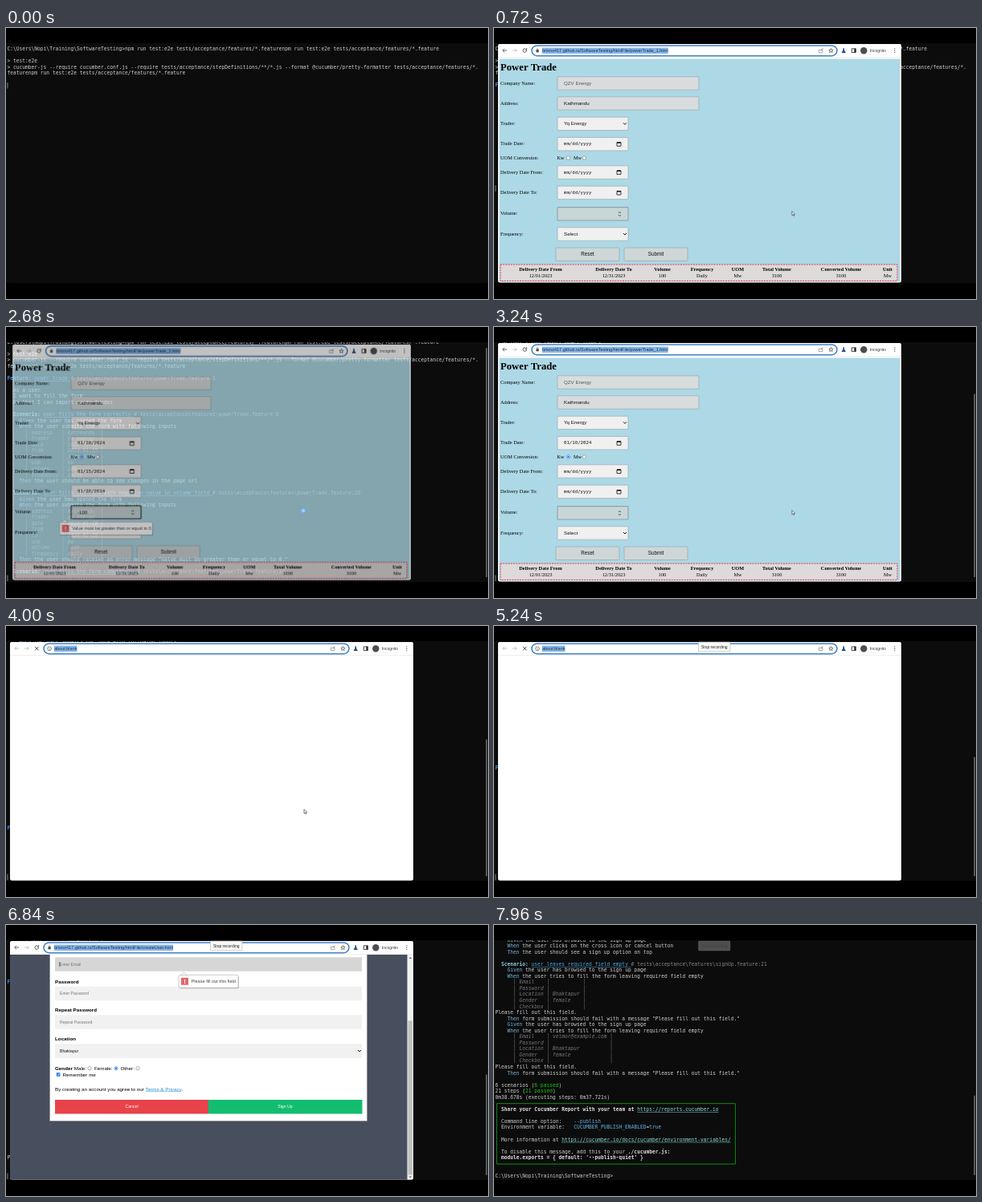
An HTML page with a canvas that plays this animation: 600 px wide and 338 px high, repeating every 8000 ms.

```html
<!DOCTYPE html>
<html lang="en">
<head>
<meta charset="utf-8">
<title>End-to-end test run</title>
<style>
html, body { margin: 0; width: 100%; height: 100%; overflow: hidden; background: #000; }
canvas { display: block; }
</style>
</head>
<body>
<canvas id="stage" width="600" height="338"></canvas>
<script>
const LOOP = 8000, ROWS = 39, CH = 3.758, LH = 7.545;
const MONO = '"DejaVu Sans Mono", monospace';
const SANS = '"Liberation Sans", Arial, sans-serif';
const SERIF = '"Liberation Serif", "Times New Roman", serif';
const HOST = 'brisno417.github.io/SoftwareTesting/htmlFile/';

const screen = document.getElementById('stage').getContext('2d');
const layer = Object.assign(document.createElement('canvas'), { width: 600, height: 338 }).getContext('2d');
let g = screen;

// ---------- drawing helpers ----------
const clamp = v => Math.max(0, Math.min(1, v));
const ease = v => { v = clamp(v); return v * v * (3 - 2 * v); };

function rect(x, y, w, h, fill, stroke, radius = 0, lineWidth = .6) {
  g.beginPath();
  g.roundRect(x, y, w, h, radius);
  if (fill) { g.fillStyle = fill; g.fill(); }
  if (stroke) { g.strokeStyle = stroke; g.lineWidth = lineWidth; g.stroke(); }
}

function path(points, color, width = .8, fill) {
  g.beginPath();
  for (let i = 0; i < points.length; i += 2) g.lineTo(points[i], points[i + 1]);
  if (fill) { g.closePath(); g.fillStyle = fill; g.fill(); }
  if (color) { g.strokeStyle = color; g.lineWidth = width; g.stroke(); }
}

function ring(x, y, r, color, width = .7, fill, sweep = 7) {
  g.beginPath();
  g.arc(x, y, r, 0, sweep);
  if (fill) { g.fillStyle = fill; g.fill(); }
  if (color) { g.strokeStyle = color; g.lineWidth = width; g.stroke(); }
}

// Glyphs are laid out ten times larger, so advances stay fractional.
function text(s, x, y, size, color, font = SANS, style = '', align = 'left') {
  g.save();
  g.translate(x, y);
  g.scale(.1, .1);
  g.font = `${style} ${size * 10}px ${font}`;
  g.fillStyle = color;
  g.textAlign = align;
  g.textBaseline = 'middle';
  g.fillText(s, 0, 0);
  const width = g.measureText(s).width / 10;
  g.restore();
  return width;
}

// ---------- terminal log; ^x switches to style x ----------
const STYLES = {
  w: ['#cccccc'], W: ['#dcdcdc', 'bold'], k: ['#74b4d8'], F: ['#3b8eea', 'bold'], f: ['#3b8eea', '', 1],
  S: ['#8fcbdc', 'bold'], s: ['#4ba3dc', '', 1], d: ['#858585'], t: ['#767676', 'italic'],
  g: ['#16c60c'], l: ['#8adada', '', 1], c: ['#61b4e6']
};
const log = [];
let stamp = 0;
const at = ms => { stamp = ms; };
const print = (...lines) => lines.forEach(s => log.push({ at: stamp, parts: s.split('^').slice(1) }));
const where = file => ` ^d# tests\\acceptance\\features\\${file}`;
const feature = (name, file, ...about) =>
  print(`^FFeature:^w ^f${name}${where(file)}`, '^w', ...about.map(s => '^w  ' + s));
const scenario = (name, file) => print('^w', `^w  ^SScenario:^w ^s${name}${where(file)}`);
const step = (word, s) => print(`^w    ^k${word}^w ${s}`);
function table(rows) {
  const wide = [0, 1].map(i => Math.max(...rows.map(r => r[i].length)));
  rows.forEach(r => print(`^w      ^t│ ${r[0].padEnd(wide[0])} │ ${r[1].padEnd(wide[1])} │`));
}
const tradeRows = volume => [['address', 'kathmandu'], ['trader', 'yq energy'], ['date', '2024-01-10'],
  ['from', '2024-01-15'], ['to', '2024-01-20'], ['uom', 'kw'], ['volume', volume], ['frequency', 'daily']];
const userRows = (email, password = '') => [['Email', email], ['Password', password],
  ['Location', 'Bhaktapur'], ['Gender', 'female'], ['Checkbox', '']];

const EMAIL = 'velmor@example.com', FILL = 'Please fill out this field.', NEGATIVE = 'Value must be greater than or equal to 0.';
const PROMPT = '^wC:\\Users\\Nopi\\Training\\SoftwareTesting>';
const RUN = 'npm run test:e2e tests/acceptance/features/*.feature';
const OPENED = 'the user has opened the form', SUBMITS = 'the user submits the form with following inputs';
const BROWSED = 'the user has browsed to the sign up page';
const LEAVES = 'the user tries to fill the form leaving required field empty';

print(PROMPT + RUN + RUN, '^w', '^w> test:e2e',
  '^w> cucumber-js --require cucumber.conf.js --require tests/acceptance/stepDefinitions/**/*.js --format @cucumber/pretty-formatter tests/acceptance/features/*.',
  '^wfeature' + RUN, '^w');
at(240);
feature('power trade', 'powerTrade.feature:1', 'As a user', 'I want to fill the form', 'So that I can import power trades');
scenario('user fills the form correctly', 'powerTrade.feature:6');
step('Given', OPENED);
at(600); step('When', SUBMITS); table(tradeRows('100'));
at(1240); step('Then', 'the user should be able to see changes in the page url');
at(1300); scenario('user fills the form with negative value in volume field', 'powerTrade.feature:20');
at(1360); step('Given', OPENED);
at(1660); step('When', SUBMITS); table(tradeRows('-100'));
at(2580); step('Then', `the user should receive an error message "${NEGATIVE}"`);
at(2620); scenario('user fills the form completely', 'powerTrade.feature:34');
at(2760); step('Given', OPENED);
at(3000); step('When', SUBMITS); table(tradeRows('100'));
at(3640); step('Then', 'the following values should be listed'); table(tradeRows('100').slice(1));
at(3800); print('^w');
feature('sign up', 'signUp.feature:1', 'As a user', 'I want to sign up', 'So that I can use the application');
scenario('user signs up with valid details', 'signUp.feature:6');
step('Given', BROWSED);
at(4140); step('When', 'the user fills the form with following details'); table(userRows(EMAIL, 'pass1234'));
at(4960); step('Then', 'the user should be signed up');
at(5060); scenario('user cancels the sign up', 'signUp.feature:16');
step('Given', BROWSED);
at(5360); step('When', 'the user clicks on the cross icon or cancel button');
at(5760); step('Then', 'the user should see a sign up option on top');
at(5940); scenario('user leaves required field empty', 'signUp.feature:21');
step('Given', BROWSED);
const failsWith = () => { print('^w' + FILL); step('Then', `form submission should fail with a message "${FILL}"`); };
at(6240); step('When', LEAVES); table(userRows(''));
at(6660); failsWith();
at(6820); step('Given', BROWSED);
at(6960); step('When', LEAVES); table(userRows(EMAIL));
at(7480); failsWith();
at(7720);
print('^w', '^w6 scenarios (^g6 passed^w)', '^w21 steps (^g21 passed^w)', '^w0m38.678s (executing steps: 0m37.721s)');
const boxTop = log.length;
print('^w', '^W  Share your Cucumber Report with your team at ^lhttps://reports.cucumber.io', '^w',
  '^w  Command line option:    ^c--publish', '^w  Environment variable:   ^cCUCUMBER_PUBLISH_ENABLED^w=^ctrue', '^w',
  '^w  More information at ^lhttps://cucumber.io/docs/cucumber/environment-variables/', '^w',
  '^w  To disable this message, add this to your ^W./cucumber.js:', "^W  module.exports = { default: '--publish-quiet' }", '^w');
const boxEnd = log.length;
at(7860); print('^w', PROMPT);

function terminal(t) {
  const count = log.filter(l => l.at <= t).length, done = count === log.length;
  const total = count + (done ? 0 : 1), top = Math.max(0, total - ROWS);
  const rowY = i => 26.5 + (i - top) * LH;
  rect(0, 19, 600, 299, '#0c0c0c');
  for (let i = Math.max(0, top - 1); i < count; i++) {
    let x = 1.5;
    for (const part of log[i].parts) {
      const [color, style = '', underline] = STYLES[part[0]], s = part.slice(1), y = rowY(i);
      text(s, x, y, 6.244, color, MONO, style);
      if (underline) rect(x, y + 2.8, s.length * CH, .5, color);
      x += s.length * CH;
    }
  }
  if (count >= boxEnd) rect(3.4, rowY(boxTop), 297, rowY(boxEnd - 1) - rowY(boxTop), null, '#138a14', 0, 1);
  if (!done) rect(1.6, rowY(count) - 3.7, .7, 7.4, '#bbb');
  if (total > ROWS) {
    const h = 293 * ROWS / total;
    rect(597.5, 312 - h, 1.2, h, '#8a8a8a');
  }
}

// ---------- browser ----------
function toolbar(url, loading) {
  rect(5, 20, 502, 17, '#fff');
  const ink = '#444', pale = loading ? '#b5b5b5' : ink;
  path([16, 28, 10.8, 28], pale); path([13, 25.7, 10.7, 28, 13, 30.3], pale);
  path([23, 28, 28.2, 28], '#b5b5b5'); path([26, 25.7, 28.3, 28, 26, 30.3], '#b5b5b5');
  if (loading) { path([36, 25.8, 40.6, 30.4], ink, 1); path([40.6, 25.8, 36, 30.4], ink, 1); }
  else { ring(38.3, 28, 2.3, ink, .8, null, 5.3); path([40.6, 25, 40.6, 27.4, 38.4, 27.4], ink); }
  rect(47, 21.9, 380, 12.8, '#fff', '#3f80c4', 6.4, 1.5);
  if (loading) { ring(54, 28.2, 2.4, '#555'); rect(53.7, 27.6, .7, 2, '#555'); }
  else { rect(52.5, 27.4, 3.2, 2.8, '#444'); ring(54.1, 27, 1.1, '#444', .6); }
  g.font = '55px ' + SANS;
  rect(60, 24.6, g.measureText(url).width / 10, 7.4, '#86b6ea');
  text(url, 60, 28.4, 5.5, '#1f2c3c');
  rect(404.5, 27, 4.5, 3.6, null, '#777'); path([406.5, 28.5, 409.5, 25.5], '#777');
  const star = [];
  for (let i = 0; i <= 10; i++) {
    const r = i % 2 ? 1.2 : 2.8, a = i * Math.PI / 5 - Math.PI / 2;
    star.push(419.5 + r * Math.cos(a), 28.3 + r * Math.sin(a));
  }
  path(star, '#444', .7);
  path([434.5, 25.3, 436, 25.3, 436.2, 28, 438, 31, 432.5, 31, 434.3, 28], null, 0, '#244e7c');
  rect(445.4, 25.8, 5, 4.8, null, '#333', 0, .9); rect(448.3, 25.8, 2.1, 4.8, '#333');
  rect(455, 23, 36, 10.5, null, '#eee', 5);
  ring(460.3, 28.2, 4.2, null, 0, '#4a4d51');
  text('Incognito', 468, 28.4, 4.9, '#333');
  [25.8, 28.2, 30.6].forEach(y => ring(498.8, y, .65, null, 0, '#444'));
}

function bubble(x, y, w, message) {
  rect(x + .8, y + 1, w, 16, 'rgba(0,0,0,.25)', null, 1.5);
  rect(x, y, w, 16, '#fff', '#aaa', 1.5);
  path([x + 3, y + .4, x + 6.5, y - 3.5, x + 10, y + .4], '#aaa', .6, '#fff');
  rect(x + 3, y + 3.4, 9, 9, '#e0686c');
  text('!', x + 7.5, y + 8.2, 8, '#fff', SANS, 'bold', 'center');
  text(message, x + 15.5, y + 8.5, 5.6, '#444');
}

function radio(x, y, on) {
  ring(x, y, 2.2, on ? '#1a73e8' : '#777', .6, '#fff');
  if (on) ring(x, y, 1.2, null, 0, '#1a73e8');
}

const typed = (s, dt, start) => s.slice(0, Math.max(0, Math.floor((dt - start) / 8)));

function trade(volume, span) {
  const page = dt => {
    const p = dt / span, edge = '#8fa2a8';
    const put = (s, y, k, empty) => text(p > k ? s : empty, 87, y + .3, 6.2, '#111');
    rect(6.5, 38.5, 499, 278, '#add8e6');
    text('Power Trade', 8, 50, 12.7, '#000', SERIF, 'bold');
    const labels = { 'Company Name:': 69, 'Address:': 94, 'Trader:': 119.4, 'Trade Date:': 144.7, 'UOM Conversion:': 162,
      'Delivery Date From:': 180, 'Delivery Date To:': 205.4, 'Volume:': 231.8, 'Frequency:': 257 };
    for (const name in labels) {
      const y = labels[name], wide = y < 100, focus = name === 'Volume:';
      text(name, 8, y, 6.35, '#000', SERIF);
      if (name === 'UOM Conversion:') continue;
      rect(79, y - 8.2, wide ? 176 : 88, 16.4, focus ? '#c8d6d8' : wide ? '#d8dcdc' : '#f0f0f0',
        focus && p > .6 ? '#222' : edge, .5, focus ? 1.1 : .6);
    }
    text('QZV Energy', 87, 69.3, 6.2, '#555');
    text(typed('Kathmandu', dt, span * .06), 87, 94.4, 6.2, '#111');
    put('Yq Energy', 119.4, .2, 'Select');
    put('Daily', 257, .8, 'Select');
    [119.4, 257].forEach(y => path([161, y - 1, 163, y + 1, 165, y - 1], '#111', 1));
    [['01/10/2024', 144.7, .3], ['01/15/2024', 180, .45], ['01/20/2024', 205.4, .55]].forEach(([s, y, k]) => {
      text(p > k ? s : 'mm/dd/yyyy', 87, y + .3, 5.7, '#111', MONO);
      rect(153, y - 2, 5, 4.6, null, '#111', 0, .8); rect(153, y - 2.4, 5, 1.5, '#111');
    });
    text('Kw', 78.5, 162, 6.3, '#000', SERIF); radio(92.5, 162, p > .38);
    text('Mw', 99, 162, 6.3, '#000', SERIF); radio(112.5, 162, false);
    text(typed(volume, dt, span * .62), 87, 232, 6.2, '#111');
    path([155, 231, 156.5, 229.3, 158, 231], '#333', .8); path([155, 233, 156.5, 234.7, 158, 233], '#333', .8);
    [['Reset', 77], ['Submit', 162]].forEach(([s, x]) => {
      rect(x, 274, 79, 16.5, '#ced6d7', edge, 1);
      text(s, x + 39.5, 282.6, 6.3, '#111', SANS, '', 'center');
    });
    g.setLineDash([2, 1.2]);
    rect(8, 295, 494, 20.4, '#dedada', '#e0364a', 0, 1);
    g.setLineDash([]);
    [['Delivery Date From', '12/01/2023', 58], ['Delivery Date To', '12/31/2023', 149], ['Volume', '100', 209.5],
      ['Frequency', 'Daily', 259], ['UOM', 'Mw', 303.5], ['Total Volume', '3100', 352],
      ['Converted Volume', '3100', 432], ['Unit', 'Mw', 490]].forEach(([head, cell, x]) => {
      text(head, x, 301, 6.3, '#000', SERIF, 'bold', 'center');
      text(cell, x, 309.3, 6.3, '#000', SERIF, '', 'center');
    });
    if (volume < 0 && p > .86) bubble(64.4, 244.3, 117, NEGATIVE);
  };
  page.url = HOST + 'powerTrade_1.html';
  return page;
}

function signUpForm(dt, email, password, tipAt) {
  const scroll = 105 * ease((dt - 100) / 160), warn = dt > tipAt;
  rect(5, 37, 495, 281, '#474e5d');
  g.save();
  g.translate(0, 105 - scroll);
  rect(54.5, -52, 395, 296.5, '#fff', '#888');
  text('Sign Up', 61, -28, 12.5, '#000', SANS, 'bold');
  text('×', 436, -40, 16, '#444');
  text('Please fill in this form to create an account.', 61, -6, 6.25, '#000');
  rect(61, 8, 382, .7, '#ddd');
  const field = (label, y, value, hint, focus) => {
    text(label, 61, y - 14.3, 6.25, '#000', SANS, 'bold');
    rect(61, y - 8.8, 382, 17.6, focus ? '#d6d6d6' : '#f1f1f1');
    text(value || hint, 67, y + .3, 5.1, value ? '#111' : '#757575');
    if (focus && !value) rect(66.6, y - 3, .6, 6, '#111');
  };
  field('Email', 49, typed(email, dt, 60), 'Enter Email', warn && !email);
  field('Password', 85.5, typed(password, dt, 150), 'Enter Password', warn && email);
  field('Repeat Password', 121, typed(password, dt, 210), 'Repeat Password');
  field('Location', 157, 'Bhaktapur', '');
  path([438, 156, 440, 158, 442, 156], '#111', 1);
  text('Gender', 61, 179.3, 6.25, '#000', SANS, 'bold');
  [['Male:', 84.8, 104], ['Female:', 110, 137], ['Other:', 142.5, 164]].forEach(([s, x, dot], i) => {
    text(s, x, 179.3, 6.25, '#000');
    radio(dot, 178.8, i === 1 && dt > 230);
  });
  rect(62.8, 184.2, 4.6, 4.6, '#1a73e8', null, .6);
  path([63.8, 186.5, 64.8, 187.6, 66.5, 185.2], '#fff', .8);
  text('Remember me', 70.5, 187, 6.25, '#000');
  const x = 61 + text('By creating an account you agree to our ', 61, 205, 6.25, '#000');
  const w = text('Terms & Privacy', x, 205, 6.25, '#2a8fd6');
  rect(x, 207.6, w, .5, '#2a8fd6');
  text('.', x + w, 205, 6.25, '#000');
  rect(61, 218, 191, 17.5, '#e8434b');
  rect(252, 218, 191.5, 17.5, '#12bd70');
  text('Cancel', 156.5, 227, 5.2, '#fff', SANS, '', 'center');
  text('Sign Up', 347.5, 227, 5.2, '#fff', SANS, '', 'center');
  if (warn) bubble(215, email ? 98.5 : 62.3, 74, FILL);
  g.restore();
  rect(499.5, 37, 8, 281, '#f1f1f1');
  rect(500.5, 45 + scroll * .71, 5.5, 192, '#c1c1c1');
  path([501.5, 42, 503.2, 40, 505, 42], null, 0, '#666');
  path([501.5, 313.5, 503.2, 315.5, 505, 313.5], null, 0, '#666');
}

function landing() {
  rect(5, 37, 502, 281, '#fff');
  rect(8, 41, 58, 18, '#12bd70');
  text('Sign Up', 37, 50.3, 5.6, '#fff', SANS, '', 'center');
}

const signUp = draw => Object.assign(draw, { url: HOST + 'createUser.html' });
// open, load, close, page
const windows = [
  [320, 560, 1280, trade('100', 600)],
  [1400, 1640, 2640, trade('-100', 900)],
  [2800, 3000, 3700, trade('100', 560)],
  [3860, 4120, 5000, signUp(dt => signUpForm(dt, EMAIL, 'pass1234', Infinity))],
  [5120, 5340, 5840, signUp(dt => dt < 300 ? signUpForm(dt, '', '', Infinity) : landing())],
  [6000, 6220, 7560, signUp(dt => dt < 680 ? signUpForm(dt, '', '', 420) : signUpForm(dt - 680, EMAIL, '', 420))]
];

function browser(t) {
  const win = windows.find(([open, , close]) => t >= open && t < close + 160);
  if (!win) return false;
  const [open, load, close, page] = win, loading = t < load;
  const shown = Math.min(clamp((t - open) / 120), 1 - clamp((t - close) / 160)), scale = .952 + .048 * shown;
  g = layer;
  g.clearRect(0, 0, 600, 338);
  g.save();
  g.beginPath();
  g.roundRect(5, 20, 502, 297.5, 2.5);
  g.clip();
  rect(5, 20, 502, 298, '#fff');
  if (!loading) page(t - load);
  toolbar(loading ? 'about:blank' : page.url, loading);
  rect(5, 36.6, 502, .5, '#ddd');
  g.restore();
  g = screen;
  g.save();
  g.globalAlpha = shown;
  g.translate(256, 168.5);
  g.scale(scale, scale);
  g.drawImage(layer.canvas, -256, -168.5);
  g.restore();
  return t < close;
}

function pointer(t, ready) {
  if (t < 240 || t > 4900) return;
  if (!ready) {
    ring(370, 229, 2.8, '#6aaeea', 1.4, '#a9cdec');
    return;
  }
  const k = ease((t - 4500) / 360);
  g.save();
  g.translate(371 - 100 * k, 228.5 - 222 * k);
  path([0, 0, 0, 5.2, 1.2, 4.1, 2, 6, 2.9, 5.6, 2.1, 3.8, 3.7, 3.8, 0, 0], '#333', .6, '#fff');
  g.restore();
}

function recordingTip(t) {
  g.save();
  g.globalAlpha = clamp((t - 4860) / 80) * (1 - .72 * clamp((t - 7860) / 100));
  rect(254.5, 20, 39.5, 12, '#f7f7f7', '#bbb', .8);
  text('Stop recording', 274.2, 26.3, 5, '#222', SANS, '', 'center');
  g.restore();
}

function frame(now) {
  const t = now % LOOP;
  rect(0, 0, 600, 338, '#000');
  terminal(t);
  pointer(t, browser(t));
  recordingTip(t);
  rect(0, 0, 600, 19, '#000');
  rect(0, 318, 600, 20, '#000');
}

const start = performance.now();
(function tick() {
  frame(performance.now() - start);
  requestAnimationFrame(tick);
})();
</script>
</body>
</html>
```
